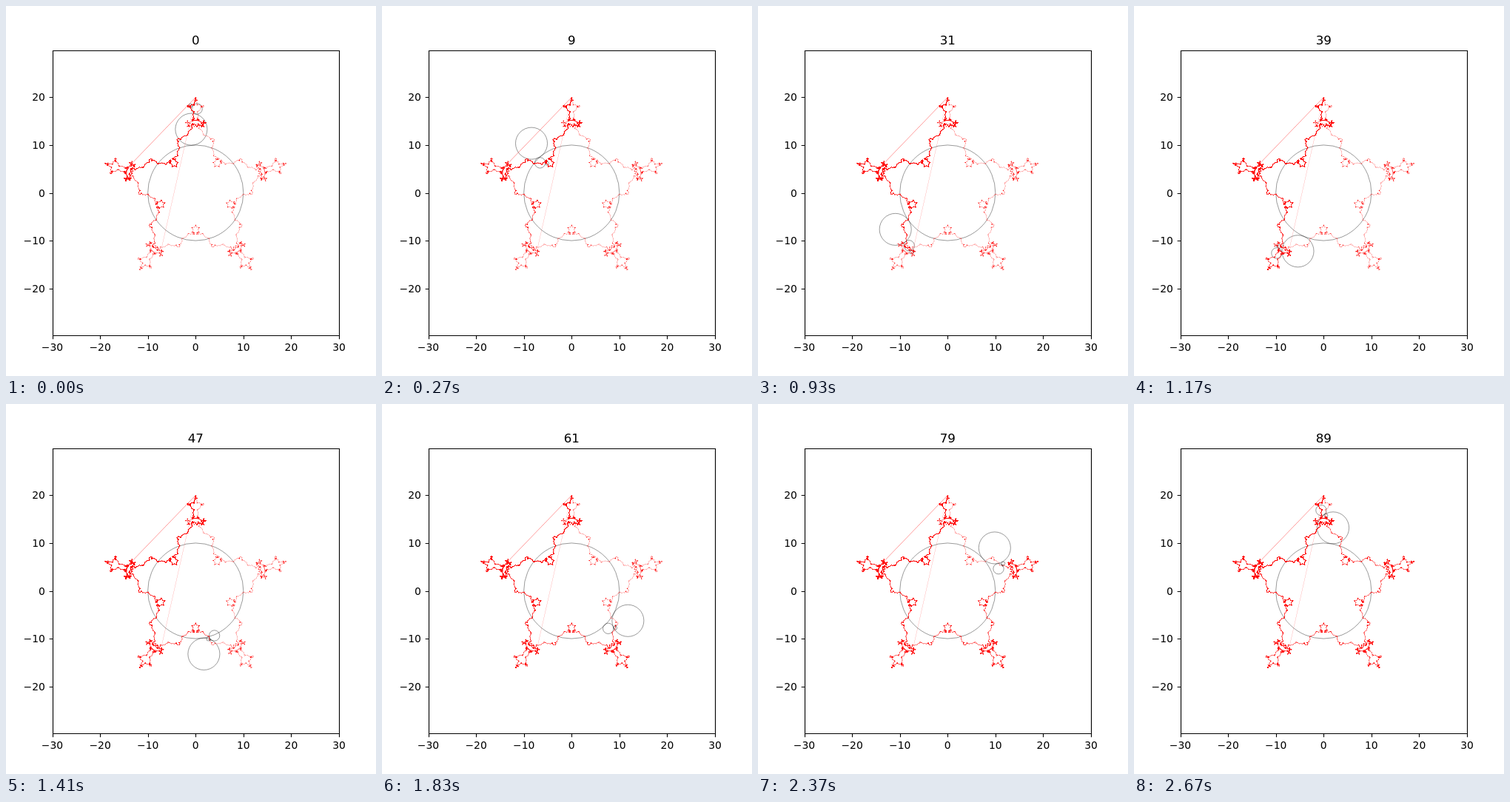
Animation of 500 by 500 pixels, one loop 2700 ms. Source, as an HTML page with a canvas:

```html
<!DOCTYPE html>
<html lang="en">
<head>
<meta charset="utf-8">
<title>Fractal roulette</title>
<style>
  html, body { margin: 0; width: 100%; height: 100%; overflow: hidden; background: #fff; }
  svg, canvas { position: absolute; left: 0; top: 0; width: 500px; height: 500px; }
  text { font-family: "DejaVu Sans", sans-serif; font-size: 13.89px; fill: #000; }
  #title { font-size: 16.67px; }
  .mid { text-anchor: middle; }
  .end { text-anchor: end; }
  #axes { fill: none; stroke: #000; stroke-width: 1.11; }
  #rings { fill: none; stroke: #000; stroke-width: .4; }
</style>
</head>
<body>
<svg id="stage" viewBox="0 0 500 500">
  <g id="rings"></g>
  <path id="axes"/>
  <g id="labels"></g>
  <text id="title" class="mid" x="256.25" y="52">0</text>
</svg>
<canvas id="curve" width="500" height="500"></canvas>
<script>
const SIZE = 500, FRAMES = 90, FRAME_MS = 30;
const DEG_PER_FRAME = 3.905;      // sweep of the first rolling circle
const STEP = 0.01;                // degrees between pen samples
const LEVELS = 9, RINGS = 6;
const SPEED = -4, SHRINK = 3, RADIUS = 10;
const CURVE_INK = 0.2, JUMP_INK = 0.139;  // line widths in pixels
const SCALE = 387.5 / 60;
const px = x => 256.25 + x * SCALE;
const py = y => 252.5 - y * SCALE;

const byId = id => document.getElementById(id);
function add(parent, tag, attrs, text) {
  const el = document.createElementNS("http://www.w3.org/2000/svg", tag);
  for (const k in attrs) el.setAttribute(k, attrs[k]);
  if (text !== undefined) el.textContent = text;
  return byId(parent).appendChild(el);
}

// Centres of the nested circles, each rolling on the one before
function chain(deg, count) {
  const out = [{ x: 0, y: 0, r: RADIUS }];
  let { x, y, r } = out[0], speed = 1;
  for (let i = 1; i <= count; i++) {
    const a = (90 + speed * deg) * Math.PI / 180;
    const next = r / SHRINK;
    x += (r + next) * Math.cos(a);
    y += (r + next) * Math.sin(a);
    r = next;
    speed *= SPEED;
    out.push({ x, y, r });
  }
  return out;
}

function penAt(deg) {
  const p = chain(deg, LEVELS)[LEVELS];
  return { x: px(p.x), y: py(p.y) };
}

// The hairline is kept as ink per pixel, so overlapping strokes add up
const cell = (x, y) => Math.floor(y) * SIZE + Math.floor(x);
const COUNT = Math.round(360 / STEP);
const cells = new Uint32Array(COUNT), inks = new Float32Array(COUNT);
let last = penAt(0);
for (let i = 0; i < COUNT; i++) {
  const p = penAt((i + 1) * STEP);
  cells[i] = cell((p.x + last.x) / 2, (p.y + last.y) / 2);
  inks[i] = CURVE_INK * Math.hypot(p.x - last.x, p.y - last.y);
  last = p;
}

function trace(ink, deg) {
  const end = Math.min(COUNT, Math.round(deg / STEP));
  for (let i = 0; i < end; i++) ink[cells[i]] += inks[i];
}

function jump(ink, a, b) {
  const len = Math.hypot(b.x - a.x, b.y - a.y), n = Math.ceil(len * 20);
  for (let i = 0; i < n; i++) {
    const u = (i + 0.5) / n;
    ink[cell(a.x + (b.x - a.x) * u, a.y + (b.y - a.y) * u)] += JUMP_INK * len / n;
  }
}

// Earlier passes; the broken-off ones jump back to the top
const base = new Float32Array(SIZE * SIZE);
for (const deg of [62.4, 62.4, 124.5]) {
  trace(base, deg);
  jump(base, penAt(deg), penAt(0));
}
trace(base, 360);

// Axes, ticks and tick labels
let box = "M63.5 60.5H450.5V445.5H63.5Z";
const sign = v => v < 0 ? "\u2212" + -v : v;
const snap = v => Math.floor(v + 0.5) + 0.5;
for (let v = -30; v <= 30; v += 10) {
  box += `M${snap(px(v))} 445.5v4.86`;
  add("labels", "text", { class: "mid", x: px(v), y: 466 }, sign(v));
  if (Math.abs(v) < 30) {
    box += `M63.5 ${snap(py(v))}h-4.86`;
    add("labels", "text", { class: "end", x: 52.8, y: Math.round(py(v) + 5) }, sign(v));
  }
}
byId("axes").setAttribute("d", box);

const rings = [];
for (let i = 0; i < RINGS; i++) rings.push(add("rings", "circle", {}));

const ctx = byId("curve").getContext("2d");
const image = ctx.createImageData(SIZE, SIZE);
const ink = new Float32Array(SIZE * SIZE);

let shown = -1;
function draw(n) {
  if (n === shown) return;
  shown = n;
  const deg = DEG_PER_FRAME * (n + 1);
  chain(deg, RINGS - 1).forEach((c, i) => {
    rings[i].setAttribute("cx", px(c.x));
    rings[i].setAttribute("cy", py(c.y));
    rings[i].setAttribute("r", c.r * SCALE);
  });
  ink.set(base);
  trace(ink, deg);
  for (let i = 0; i < ink.length; i++) {
    image.data[i * 4] = 255;
    image.data[i * 4 + 3] = Math.min(1, ink[i]) * 255;
  }
  ctx.putImageData(image, 0, 0);
  byId("title").textContent = n;
}

const start = performance.now();
function tick() {
  draw(Math.floor((performance.now() - start) / FRAME_MS) % FRAMES);
  requestAnimationFrame(tick);
}
draw(0);
requestAnimationFrame(tick);
</script>
</body>
</html>
```
